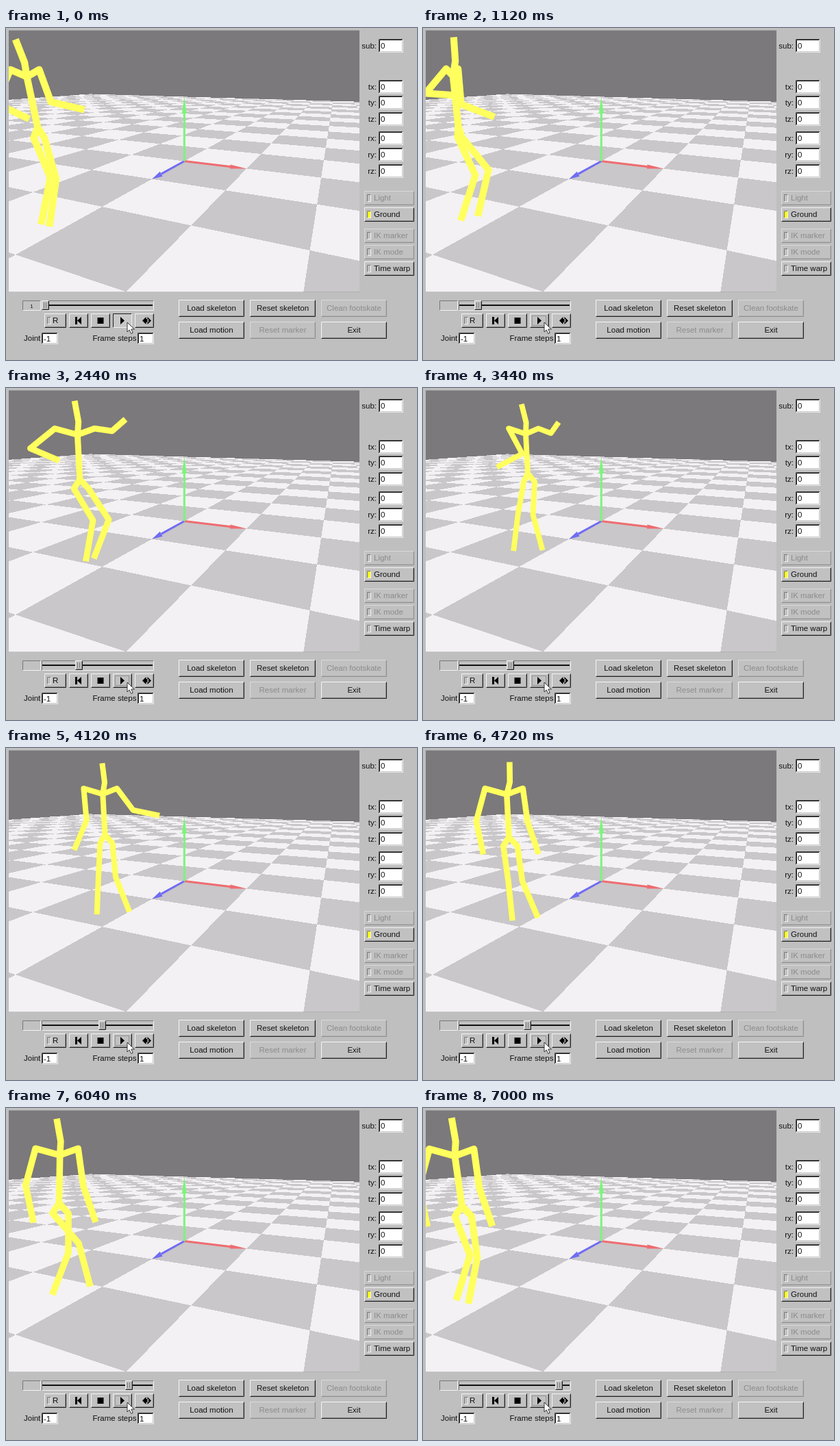
Write an HTML page that moves like this. It is 600x485 px and loops after 7.04 s.

```html
<!DOCTYPE html>
<html lang="en">
<head>
<meta charset="utf-8">
<title>Skeleton motion viewer</title>
<style>
  html, body { margin: 0; width: 100%; height: 100%; overflow: hidden; background: #bfbfbf; }
  svg { display: block; width: 600px; height: 485px; }
  text { font: 11.5px "Liberation Sans", Arial, sans-serif; }
</style>
</head>
<body>
<svg id="stage" viewBox="0 0 600 485" xmlns="http://www.w3.org/2000/svg">
  <defs><clipPath id="view"><rect x="4" y="3.5" width="512" height="382"/></clipPath></defs>
  <rect width="600" height="485" fill="#bfbfbf"/>
  <g clip-path="url(#view)">
    <rect x="4" y="3" width="512" height="383" fill="#7b797b"/>
    <g id="scene"></g>
    <g id="figure" fill="none" stroke="#ffff5e" stroke-linejoin="round"></g>
  </g>
  <g id="panel"></g>
  <g id="knob"></g>
  <path d="M177 430v14l3.2-3 2.4 5.4 2.6-1.1-2.4-5.3h4.6z" fill="#fff" stroke="#222" stroke-width=".9"/>
</svg>
<script>
const LOOP = 7040, STEP = 40, RAD = Math.PI / 180;
const $ = id => document.getElementById(id);

function add(parent, tag, attrs, text) {
  const node = document.createElementNS('http://www.w3.org/2000/svg', tag);
  for (const key in attrs) node.setAttribute(key, attrs[key]);
  if (text !== undefined) node.textContent = text;
  parent.appendChild(node);
  return node;
}

// Camera: looks at the world origin, 45 degree field of view.
const YAW = 25 * RAD, PITCH = 15 * RAD;
const FOCAL = 191 / Math.tan(22.5 * RAD), DISTANCE = 5;

function project(x, y, z) {
  const side = x * Math.cos(YAW) - z * Math.sin(YAW);
  const near = x * Math.sin(YAW) + z * Math.cos(YAW);
  const up = y * Math.cos(PITCH) - near * Math.sin(PITCH);
  const depth = DISTANCE - near * Math.cos(PITCH) - y * Math.sin(PITCH);
  return { x: 260.3 + FOCAL * side / depth, y: 194.5 - FOCAL * up / depth, depth };
}

const polygon = points => 'M' + points.map(p => p.x.toFixed(2) + ' ' + p.y.toFixed(2)).join('L') + 'Z';

function drawFloor(scene) {
  const HALF = 15;
  const shades = ['', ''];
  for (let i = -HALF; i < HALF; i++) {
    for (let j = -HALF; j < HALF; j++) {
      const tile = [[0, 0], [1, 0], [1, 1], [0, 1]].map(([a, b]) => project(i + a, 0, j + b));
      if (tile.every(p => p.depth > 0.2)) shades[Math.abs(i + j) % 2] += polygon(tile);
    }
  }
  ['#c9c7c9', '#f3f1f3'].forEach((fill, k) =>
    add(scene, 'path', { d: shades[k], fill, 'shape-rendering': 'crispEdges' }));
}

function drawAxis(scene, axis, color, headWidth) {
  const at = length => project(...axis.map(v => v * length));
  const start = at(0), base = at(0.75), tip = at(1);
  const span = Math.hypot(tip.x - start.x, tip.y - start.y);
  const nx = -(tip.y - start.y) / span * headWidth / 2;
  const ny = (tip.x - start.x) / span * headWidth / 2;
  add(scene, 'path', { d: `M${start.x} ${start.y}L${base.x} ${base.y}`, stroke: color, 'stroke-width': 3 });
  add(scene, 'path', {
    d: polygon([{ x: base.x + nx, y: base.y + ny }, tip, { x: base.x - nx, y: base.y - ny }]), fill: color
  });
}

// Panel widgets
const panel = $('panel');
const FADED = { light: '#dadada', dark: '#8f8f8f', inner: '#b2b2b2' };
const SUNKEN = { light: '#777', dark: '#f2f2f2', inner: null };

function bevel(parent, x, y, w, h, { fill = '#c1c1c1', light = '#f4f4f4', dark = '#222', inner = '#8c8c8c' } = {}) {
  const group = add(parent, 'g', {});
  add(group, 'rect', { x, y, width: w, height: h, fill });
  const edge = (d, stroke) => add(group, 'path', { d, stroke, fill: 'none' });
  edge(`M${x + .5} ${y + h - .5}V${y + .5}H${x + w - .5}`, light);
  if (inner) edge(`M${x + 1.5} ${y + h - 1.5}H${x + w - 1.5}V${y + 1.5}`, inner);
  edge(`M${x + .5} ${y + h - .5}H${x + w - .5}V${y + .5}`, dark);
  return group;
}

function label(x, y, text, fill = '#111', anchor = 'start') {
  return add(panel, 'text', { x, y, fill, 'text-anchor': anchor }, text);
}

function button(x, y, text, off) {
  bevel(panel, x, y, 96, 25, off ? FADED : {});
  label(x + 48, y + 16.3, text, off ? '#8b8b8b' : '#111', 'middle');
}

function check(x, y, on) {
  bevel(panel, x, y, 6, 11, { ...SUNKEN, fill: on ? '#ffff00' : '#c1c1c1' });
}

function toggle(y, text, off, on) {
  bevel(panel, 523, y, 73, 21, off ? FADED : {});
  check(527, y + 5, on);
  label(537, y + 14.3, text, off ? '#8b8b8b' : '#111');
}

function field(x, y, w, h, value) {
  bevel(panel, x, y, w, h, { fill: '#fff', light: '#444', dark: '#e6e6e6', inner: '#c8c8c8' });
  add(panel, 'path', { d: `M${x + 1.5} ${y + h - 2}V${y + 1.5}H${x + w - 2}`, stroke: '#222', fill: 'none' });
  label(x + 3, y + h / 2 + 4.2, value);
}

function drawPanel() {
  ['sub', 'tx', 'ty', 'tz', 'rx', 'ry', 'rz'].forEach((name, i) => {
    const y = i ? Math.round(52 + i * 23.7 + (i > 3 ? 4.5 : 0)) : 16;
    label(541, y + 13.5, name + ':', '#111', 'end');
    field(544, y, 36, 20, '0');
  });

  toggle(238, 'Light', true);
  toggle(262, 'Ground', false, true);
  toggle(293, 'IK marker', true);
  toggle(317, 'IK mode', true);
  toggle(341, 'Time warp');

  button(252, 397, 'Load skeleton');
  button(356, 397, 'Reset skeleton');
  button(460, 397, 'Clean footskate', true);
  button(252, 429, 'Load motion');
  button(356, 429, 'Reset marker', true);
  button(460, 429, 'Exit');

  bevel(panel, 24, 398, 27, 15, SUNKEN);
  bevel(panel, 52, 398, 164, 15, SUNKEN);
  add(panel, 'rect', { x: 53, y: 404, width: 161, height: 2, fill: '#111' });

  bevel(panel, 56, 417, 32, 21);
  check(60, 422);
  label(68, 431.3, 'R');
  for (let i = 0; i < 4; i++) bevel(panel, 92 + 32 * i, 417, 28, 21);
  add(panel, 'rect', {
    x: 159.5, y: 420.5, width: 20, height: 14, fill: 'none', stroke: '#666', 'stroke-dasharray': '1 1'
  });
  const pressed = bevel(panel, 156, 417, 28, 21, { ...SUNKEN, light: '#222', fill: '#c8c8c8' });
  add(panel, 'path', {
    d: 'M101 422h3v11h-3zM110 422v11l-6-5.5zM133.5 423h9v9h-9zM167 422v11l6-5.5z' +
       'M199 427.5l5.5-5.5v11zM212 427.5l-5.5-5.5v11zM203 425h5v5h-5z'
  });

  label(26, 457.3, 'Joint');
  field(52, 445, 24, 17, '-1');
  label(126.5, 457.3, 'Frame steps');
  field(192, 445, 24, 17, '1');
  return pressed;
}

// Poses hold bone angles in degrees from straight down (torso: from straight up).
// arms and legs: left upper, left lower, right upper, right lower.
const REST = { lean: -3, head: -5, face: 0.95, arms: [-15, 12, 8, 19] };
const POSES = [
  { at: 0, lean: -12, head: -17, face: 0.6, arms: [-23, 65, 20, 77], legs: [23, -11, 16, -8] },
  { at: 1120, lean: -6, head: 1, face: 0.25, arms: [-40, 86, 5, 69], legs: [25, -18, 39, -13] },
  { at: 2440, arms: [-51, 67, 82, 131], legs: [31, -10, 33, -21] },
  { at: 3440, head: -8, face: 0.8, arms: [28, -62, 69, 145], legs: [-10, -7, -3, 15] },
  { at: 4720, head: 5, legs: [8, 6, 8, 23] },
  { at: 6040, lean: 1, legs: [41, 15, 0, -21] },
  { at: 7000, lean: -8, legs: [21, -17, 8, -11] }
].map(pose => ({ ...REST, ...pose }));

const mix = (a, b, u) => Array.isArray(a) ? a.map((v, k) => mix(v, b[k], u)) : a + (b - a) * u;

function poseAt(t) {
  const next = Math.max(1, POSES.findIndex(pose => pose.at >= t));
  const from = POSES[next - 1], to = POSES[next];
  const u = (t - from.at) / (to.at - from.at);
  const pose = {};
  for (const key in from) pose[key] = mix(from[key], to[key], u);
  // A stride between poses: the legs swing in opposite directions.
  const stride = 12 * Math.sin(2 * Math.PI * u);
  pose.legs = pose.legs.map((angle, k) => angle + (k < 2 ? stride : -stride));
  return pose;
}

const move = ([x, y], angle, length) =>
  [x + length * Math.sin(angle * RAD), y + length * Math.cos(angle * RAD)];

function limb(start, upper, lower, upperLength, lowerLength) {
  const middle = move(start, upper, upperLength);
  return [start, middle, move(middle, lower, lowerLength)];
}

function bonesAt(t) {
  const pose = poseAt(t);
  // The walk goes away from the camera until 3.44 s, then more slowly back.
  const away = Math.exp(-(((t - 3440) / (t < 3440 ? 1350 : 2350)) ** 2));
  const scale = 1.3 - 0.3 * away;
  const pelvis = [46 + 107 * away, 145 - 20 * away];
  const chest = move(pelvis, 180 - pose.lean, 58 * scale);
  const head = move(chest, 180 - pose.head, 44 * scale);
  const neck = [mix(head[0], chest[0], 0.62) + 3, mix(head[1], chest[1], 0.62)];

  const arm = (k, reach) => {
    const [upper, lower] = pose.arms.slice(k, k + 2);
    // A raised forearm points at the camera and looks shorter.
    const length = 46 * scale * (1 - 0.66 * Math.abs(Math.sin(lower / 2 * RAD)) ** 3);
    const shoulder = [chest[0] + reach * pose.face * scale, chest[1] - 8 * scale];
    return limb(shoulder, upper, lower, length, length);
  };
  const leg = (k, side) => {
    const hip = [pelvis[0] + 2 + side * 10 * pose.face * scale, pelvis[1] + 12 * scale];
    return limb(hip, pose.legs[k], pose.legs[k + 1], 48 * scale, 54 * scale);
  };
  return {
    width: 7.9 * scale,
    chains: [
      [head, neck, chest, pelvis],
      [...arm(0, -31).reverse(), chest, ...arm(2, 23)],
      [...leg(0, -1).reverse(), pelvis, ...leg(2, 1)]
    ]
  };
}

drawFloor($('scene'));
drawAxis($('scene'), [1, 0, 0], '#ee6c70', 6);
drawAxis($('scene'), [0, 0, 1], '#706cf4', 8);
drawAxis($('scene'), [0, 1, 0], '#7cf47c', 7);
const pressed = drawPanel();
const counter = label(37.5, 408.5, '1', '#111', 'middle');
counter.style.fontSize = '8px';
const bones = [0, 1, 2].map(() => add($('figure'), 'path', {}));
bevel($('knob'), -5, 398, 11, 14);
add($('knob'), 'path', { d: 'M-1.5 401v8M1.5 401v8', stroke: '#777' });

function render(time) {
  const t = Math.floor((time % LOOP) / STEP) * STEP;
  const { width, chains } = bonesAt(t);
  $('figure').setAttribute('stroke-width', width.toFixed(2));
  chains.forEach((chain, k) =>
    bones[k].setAttribute('d', 'M' + chain.map(p => p.map(v => v.toFixed(1)).join(' ')).join('L')));
  $('knob').setAttribute('transform', `translate(${Math.round(57.4 + t * 0.0201)} 0)`);
  for (const node of [counter, pressed]) node.setAttribute('visibility', t < STEP ? 'visible' : 'hidden');
}

const begin = performance.now();
function tick() {
  render(performance.now() - begin);
  requestAnimationFrame(tick);
}
tick();
</script>
</body>
</html>
```
